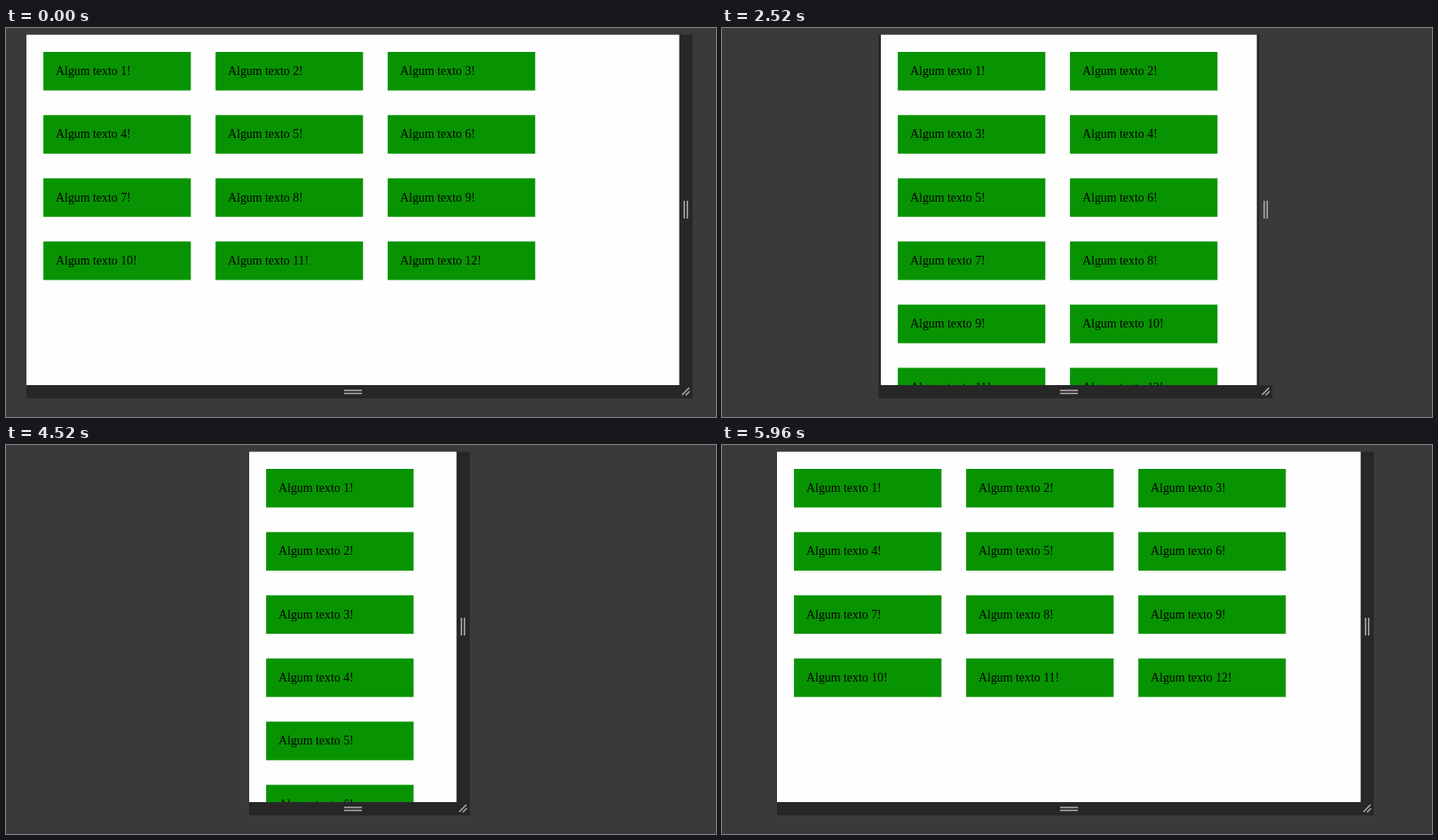
Recreate the animation shown at these times as an HTML page with a canvas. Size 800 by 439 pixels, loop 6 s.

```html
<!DOCTYPE html>
<html lang="pt">
<head>
<meta charset="utf-8">
<title>Resizable flex viewport</title>
<style>
html, body { margin: 0; width: 100%; height: 100%; overflow: hidden; background: #3b393a; }
canvas { display: block; }
</style>
</head>
<body>
<canvas id="stage" width="800" height="439"></canvas>
<script>
const ctx = document.getElementById('stage').getContext('2d');
const LOOP = 6000, STEP = 40, LAG = 20;
const TOP = 7.6, BOTTOM = 403, BAR = 15, SUM = 781.6;
const CARD = { w: 166.2, h: 43.5, pitchX: 194, pitchY: 71.3, inset: 19.1, pad: 14 };

// Turning points of the drag: time and left edge of the page
const times = [1280, 1400, 1920, 2520, 3480, 4520, 5360, 5960];
const edges = [23, 44, 80, 179, 277, 274, 111, 62];

const secant = i => (edges[i + 1] - edges[i]) / (times[i + 1] - times[i]);

// Harmonic mean of the neighbouring slopes keeps the curve monotone
function slope(i) {
  const a = secant(i - 1), b = secant(i);
  return a * b > 0 ? 2 * a * b / (a + b) : 0;
}

function leftAt(t) {
  if (t <= times[0]) return edges[0];
  const i = Math.max(1, times.findIndex(k => k >= t)) - 1;
  const span = times[i + 1] - times[i], u = (t - times[i]) / span;
  const ease = u * u * (3 - 2 * u);
  return edges[i] + (edges[i + 1] - edges[i]) * ease
    + span * u * (1 - u) * (slope(i) * (1 - u) - slope(i + 1) * u);
}

function rect(color, x, y, w, h) {
  ctx.fillStyle = color;
  ctx.fillRect(x, y, w, h);
}

function line(x0, y0, x1, y1) {
  ctx.beginPath();
  ctx.moveTo(x0, y0);
  ctx.lineTo(x1, y1);
  ctx.stroke();
}

function drawCards(left, right) {
  const columns = Math.max(1, Math.floor((right - left - 11) / CARD.pitchX));
  ctx.save();
  ctx.beginPath();
  ctx.rect(left, TOP, right - left, BOTTOM - TOP);
  ctx.clip();
  ctx.font = '13.85px "Liberation Serif", serif';
  for (let i = 0; i < 12; i++) {
    const x = left + CARD.inset + i % columns * CARD.pitchX;
    const y = 27 + Math.floor(i / columns) * CARD.pitchY;
    rect('#089402', x, y, CARD.w, CARD.h);
    ctx.fillStyle = '#000';
    ctx.fillText(`Algum texto ${i + 1}!`, x + CARD.pad, y + 26);
  }
  ctx.restore();
}

function drawGrips(right) {
  ctx.strokeStyle = '#b0b0b0';
  ctx.lineWidth = 1.5;
  for (const d of [0, 3.4]) {
    line(right + 5.7 + d, 195, right + 5.7 + d, 215);
    line(381, 409 + d, 401, 409 + d);
  }
  line(right + 3.2, 414, right + 11.2, 406);
  line(right + 7.2, 414.5, right + 11.7, 410);
}

function draw(t) {
  const left = leftAt(t), right = SUM - left;
  // The handles trail the page slightly
  const barLeft = leftAt(t - LAG), barRight = SUM - barLeft;
  // The side bar is not painted while the page shrinks
  const shrinking = t >= 1320 && t < 3240;
  rect('#3b393a', 0, 0, 800, 439);
  rect('#272728', barLeft, TOP, barRight - barLeft + (shrinking ? 0 : BAR), BOTTOM - TOP);
  rect('#272728', barLeft, BOTTOM, barRight - barLeft + BAR, BAR);
  rect('#fefefe', left, TOP, right - left, BOTTOM - TOP);
  drawCards(left, right);
  drawGrips(barRight);
}

function tick() {
  const t = performance.now() % LOOP;
  draw(Math.floor(t / STEP) * STEP);
  requestAnimationFrame(tick);
}
tick();
</script>
</body>
</html>
```
